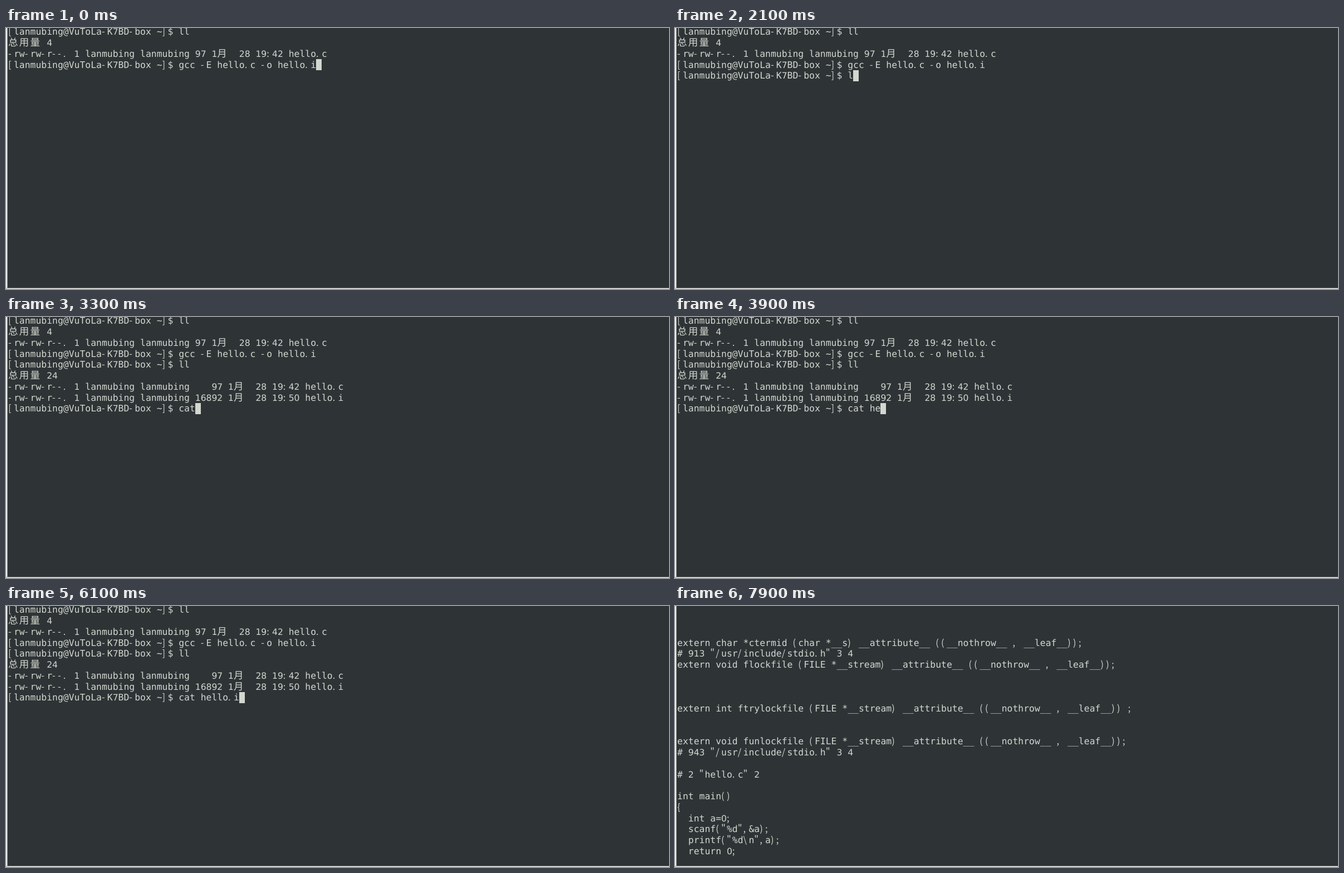
Animation, 1191 px wide and 470 px high, one loop 8000 ms. Source, as an HTML page:

```html
<!DOCTYPE html>
<html lang="zh-CN">
<head>
<meta charset="utf-8">
<title>Terminal</title>
<style>
  html, body { margin: 0; width: 100%; height: 100%; overflow: hidden; background: #2e3436; }
  svg { display: block; }
  text { fill: #d3d7cf; font: 16.4px "DejaVu Sans Mono", monospace; text-rendering: geometricPrecision; }
  .digit { font: 15.6px "DejaVu Sans", sans-serif; }
  .thin { font: 16.4px "Noto Sans CJK SC", "Noto Sans CJK", sans-serif; }
  .wide { font: 17.5px "Noto Sans CJK SC", "Noto Sans CJK", sans-serif; }
</style>
</head>
<body>
<svg width="1191" height="470" viewBox="0 0 1191 470">
  <rect width="1191" height="470" fill="#2e3436"/>
  <g id="screen"></g>
  <rect width="2" height="470" fill="#eeeeec"/>
  <rect x="2" width="1" height="470" fill="#858987"/>
  <rect y="468" width="1191" height="1" fill="#a9acaa"/>
  <rect y="469" width="1191" height="1" fill="#eeeeec"/>
</svg>
<script>
const LOOP = 8000, CELL = 9.875, ROW = 19.75, LEFT = 4, TOP = -3, BASELINE = 15.3;
const USER = 'lanmubing';
const PROMPT = `[${USER}@VuToLa-K7BD-box ~]$ `;
const COMPILE = PROMPT + 'gcc -E hello.c -o hello.i';

const entry = (size, time, name) => `-rw-rw-r--. 1 ${USER} ${USER} ${size} 1月  28 ${time} ${name}`;
const before = [PROMPT + 'll', '总用量 4', entry('97', '19:42', 'hello.c')];
const listed = [...before, COMPILE, PROMPT + 'll', '总用量 24',
  entry('   97', '19:42', 'hello.c'), entry('16892', '19:50', 'hello.i')];

const ATTR = '__attribute__ ((__nothrow__ , __leaf__))';
const code = String.raw`extern char *ctermid (char *__s) ${ATTR};
# 913 "/usr/include/stdio.h" 3 4
extern void flockfile (FILE *__stream) ${ATTR};



extern int ftrylockfile (FILE *__stream) ${ATTR} ;


extern void funlockfile (FILE *__stream) ${ATTR};
# 943 "/usr/include/stdio.h" 3 4

# 2 "hello.c" 2

int main()
{
  int a=0;
  scanf("%d",&a);
  printf("%d\n",a);
  return 0;

}`.split('\n');

// Moments at which each typed key appears
const llKeys = [2100, 2300];
const catKeys = [3000, 3100, 3300, 3400, 3700, 3900, 4600, 4700, 5200, 5900, 6100];
const typed = (text, keys, t) => PROMPT + text.slice(0, keys.filter(k => k <= t).length);

function linesAt(t) {
  if (t < 1000) return [...before, COMPILE];
  if (t < 2500) return [...before, COMPILE, typed('ll', llKeys, t)];
  if (t < 6400) return [...listed, typed('cat hello.i', catKeys, t)];
  if (t < 7900) return [...code, PROMPT];
  return ['', '', '', ...code.slice(0, 20)];
}

const isWide = ch => ch > '\u2e80';

function fontClass(ch) {
  if (isWide(ch)) return 'wide';
  if (/\d/.test(ch)) return 'digit';
  return /[-.:,;()[\]{}\/\\"]/.test(ch) ? 'thin' : '';
}

function drawLine(line, row) {
  let col = 0, spans = '';
  for (const ch of line) {
    if (ch !== ' ') {
      const glyph = ch === '&' ? '&amp;' : ch;
      spans += `<tspan x="${LEFT + col * CELL}" class="${fontClass(ch)}">${glyph}</tspan>`;
    }
    col += isWide(ch) ? 2 : 1;
  }
  return `<text y="${TOP + row * ROW + BASELINE}">${spans}</text>`;
}

function drawCursor(lines) {
  const x = Math.round(LEFT + lines.at(-1).length * CELL);
  const y = Math.floor(TOP + (lines.length - 1) * ROW);
  return `<rect x="${x}" y="${y}" width="10" height="20" fill="#d3d7cf"/>`;
}

const screenGroup = document.getElementById('screen');
let shown = '';

function render(t) {
  const lines = linesAt(t);
  const key = lines.join('\n');
  if (key !== shown) {
    shown = key;
    screenGroup.innerHTML = lines.map(drawLine).join('') + (t < 7900 ? drawCursor(lines) : '');
  }
}

function tick() {
  render(performance.now() % LOOP);
  requestAnimationFrame(tick);
}
tick();
</script>
</body>
</html>
```
